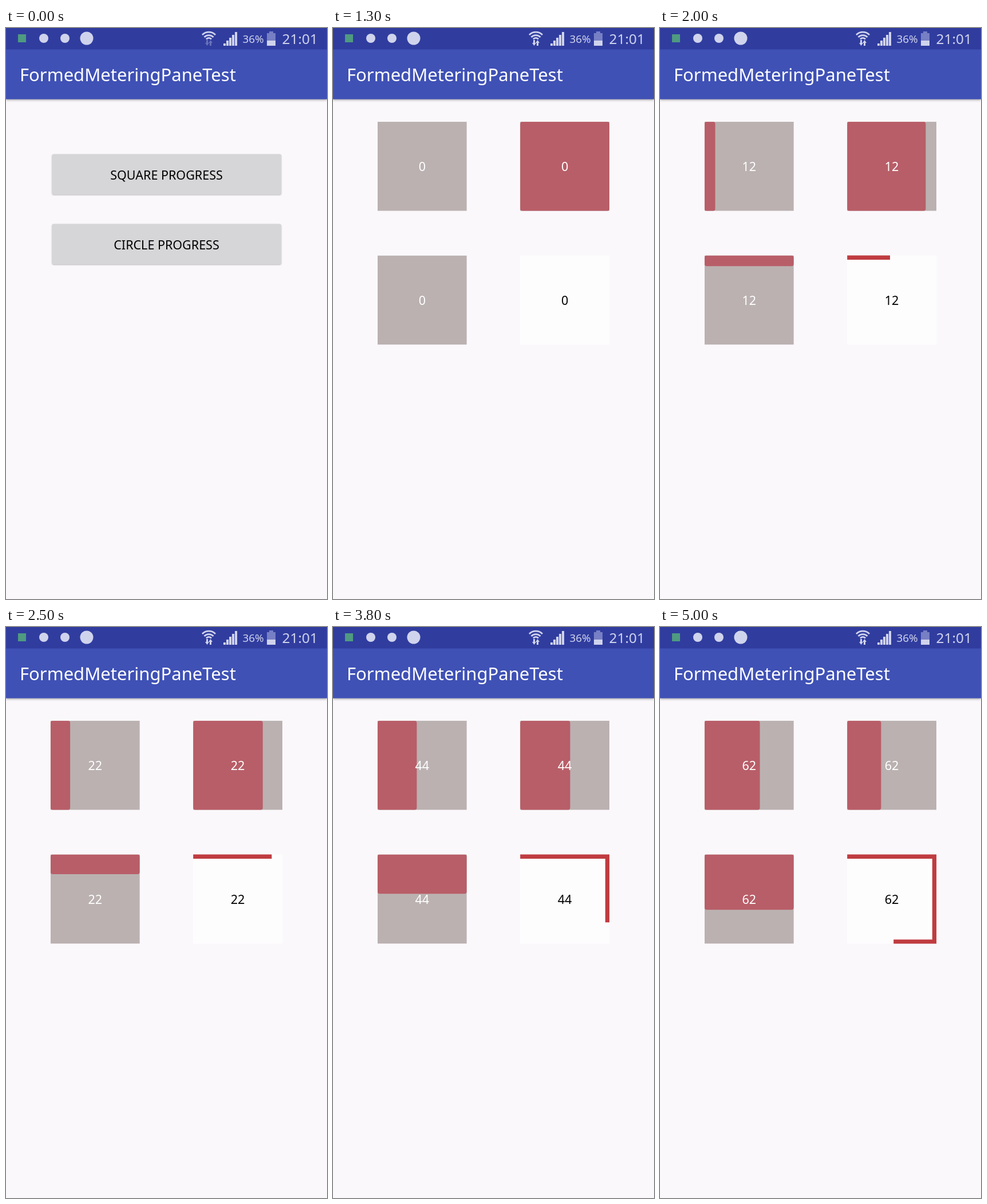
An HTML page that plays this animation: 561x998 px, repeating every 5100 ms.

```html
<!DOCTYPE html>
<html lang="en">
<head>
<meta charset="utf-8">
<title>Shaped progress</title>
<style>
  html, body { margin: 0; width: 100%; height: 100%; overflow: hidden; background: #faf8fb; }
  svg { display: block; }
  text { font: 21.5px "Noto Sans", sans-serif; }
  .mid { text-anchor: middle; }
  .button { fill: #d6d5d7; filter: drop-shadow(0 1px 1px #0004); }
  .button.pressed { fill: #d3d3d4; filter: drop-shadow(0 1.5px 2px #0006); }
  .bar { filter: drop-shadow(0 1px 2px #0006); }
  .track { fill: #bbb1b1; }
  .fill { fill: #b85e68; }
</style>
</head>
<body>
<svg width="561" height="998" viewBox="0 0 561 998">
  <rect width="561" height="998" fill="#faf8fb"/>

  <g id="menu">
    <rect id="squareButton" class="button" x="80.5" y="220.5" width="400.5" height="70.5" rx="3"/>
    <text class="mid" x="280.5" y="264.5">SQUARE PROGRESS</text>
    <rect class="button" x="80.5" y="342.5" width="400.5" height="70.5" rx="3"/>
    <text class="mid" x="280.5" y="386.5">CIRCLE PROGRESS</text>
  </g>

  <g id="demo">
    <rect y="125" width="561" height="873" fill="#faf8fb"/>
    <svg x="77.8" y="163.7" width="156" height="156">
      <rect class="track" width="156" height="156"/>
      <rect class="fill" id="growRight" width="0" height="156" rx="4"/>
      <text class="mid count" x="78" y="86.8" fill="#fff"></text>
    </svg>
    <svg x="327.1" y="163.7" width="156" height="156">
      <rect class="track" width="156" height="156"/>
      <rect class="fill" id="shrinkLeft" width="156" height="156" rx="4"/>
      <text class="mid count" x="78" y="86.8" fill="#fff"></text>
    </svg>
    <svg x="77.8" y="397.6" width="156" height="156">
      <rect class="track" width="156" height="156"/>
      <rect class="fill" id="growDown" width="156" height="0" rx="4"/>
      <text class="mid count" x="78" y="86.8" fill="#fff"></text>
    </svg>
    <svg x="327.1" y="397.6" width="156" height="156">
      <rect width="156" height="156" fill="#fefdfe"/>
      <path id="outline" d="M0 0H156V156H0Z" pathLength="100" fill="none" stroke="#bf3c40" stroke-width="14.6"/>
      <text class="mid count" x="78" y="86.8"></text>
    </svg>
  </g>

  <rect class="bar" y="37" width="561" height="87.5" fill="#3f51b5"/>
  <rect width="561" height="37.5" fill="#303d9f"/>
  <text x="24" y="93" fill="#fff" style="font-size:31px">FormedMeteringPaneTest</text>

  <g fill="#d0d3ec">
    <rect x="21" y="11" width="14" height="14" fill="#4f9a80"/>
    <circle cx="66" cy="18" r="8"/>
    <circle cx="103" cy="18" r="8"/>
    <circle cx="141" cy="18" r="11.5"/>
    <path d="M343 12A16 16 0 0 1 366 12M346.5 16A11 11 0 0 1 362.5 16M350 19.5A6 6 0 0 1 359 19.5"
      fill="none" stroke="#d0d3ec" stroke-width="2.8"/>
    <path id="arrows" d="M350 21h3v5h2l-3.5 5-3.5-5h2zM356 31h3v-5h2l-3.5-5-3.5 5h2z"/>
    <path d="M380 31v-4h4v4zM385 31v-9h4v9zM390 31v-14h4v14zM395 31v-19h4v19zM400 31v-24h4v24z"/>
    <text x="413.5" y="26" style="font-size:18.8px">36%</text>
    <path fill="#777fc5" d="M456 9h4v-3h7v3h4v14h-15z"/>
    <rect x="456" y="22" width="15" height="9"/>
    <text x="482.5" y="28" style="font-size:24.4px">21:01</text>
  </g>
</svg>

<script>
const LOOP = 5100, TICK = 100, SIDE = 156;
const keys = [[1250, 0], [1600, 6], [2500, 22], [3200, 34], [4400, 54], [5000, 62]];
const $ = id => document.getElementById(id);
const clamp = x => Math.min(1, Math.max(0, x));
const counts = document.querySelectorAll('.count');

// The counter advances two percent at a time.
function progressAt(t) {
  let value = 0;
  for (let i = 1; i < keys.length; i++) {
    const [t0, v0] = keys[i - 1], [t1, v1] = keys[i];
    value += (v1 - v0) * clamp((t - t0) / (t1 - t0));
  }
  return 2 * Math.floor(value / 2 + 1e-6);
}

function draw(now) {
  const t = Math.floor(now % LOOP / TICK) * TICK;
  const percent = progressAt(t), length = SIDE * percent / 100;

  $('squareButton').classList.toggle('pressed', t >= 700);
  $('demo').setAttribute('opacity', clamp((t - 1000) / 200));
  $('arrows').setAttribute('opacity', t < 700 || (t >= 4300 && t < 4800) ? 0.35 : 1);

  $('growRight').setAttribute('width', length);
  $('shrinkLeft').setAttribute('width', SIDE - length);
  $('growDown').setAttribute('height', length);
  $('outline').setAttribute('stroke-dasharray', `${percent} 100`);
  counts.forEach(label => label.textContent = percent);
}

function loop() {
  draw(performance.now());
  requestAnimationFrame(loop);
}
loop();
</script>
</body>
</html>
```
